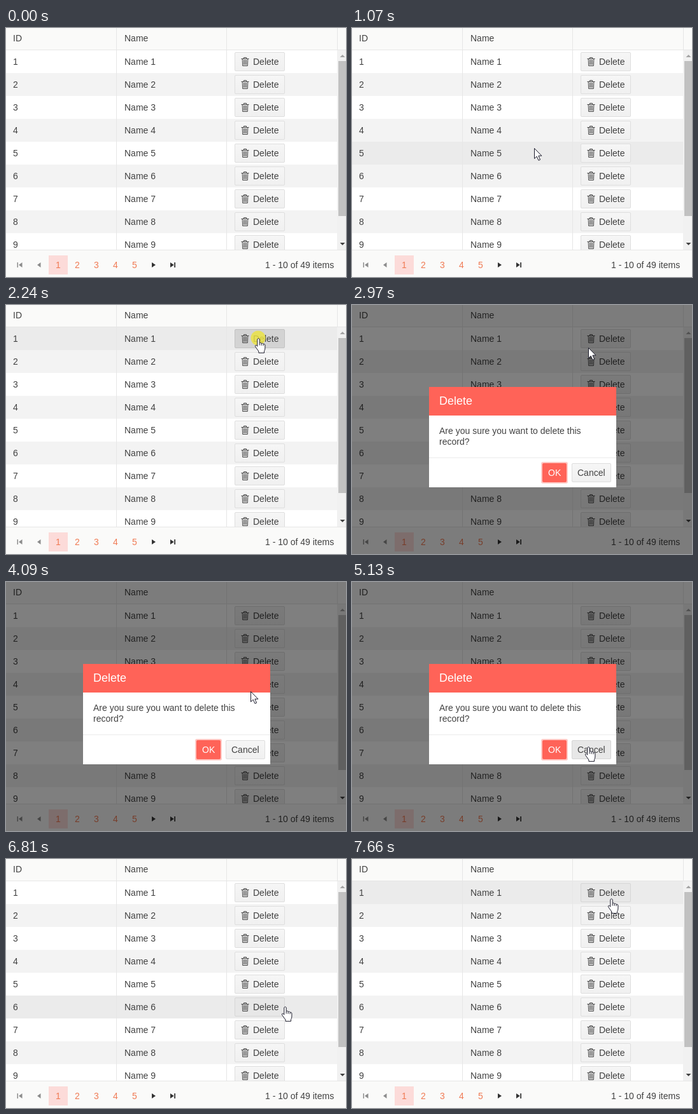
Recreate the animation shown at these times as an HTML page. Size 534 px wide and 392 px high, loop 7990 ms.

```html
<!DOCTYPE html>
<html lang="en">
<head>
<meta charset="utf-8">
<title>Grid delete confirmation</title>
<style>
  html, body { margin: 0; width: 100%; height: 100%; overflow: hidden; background: #fff; }
  svg { display: block; width: 100vw; height: 100vh; }
  text { font: 14px "Liberation Sans", Arial, sans-serif; fill: #424242; white-space: pre; }
  .line { fill: #e6e6e6; }
  .btn { fill: url(#face); stroke: #dedede; }
  .btn.hover { fill: #e7e7e7; stroke: #d6d6d6; }
  .btn.down { fill: #d3d3d3; stroke: #c2c2c2; }
  .icon { fill: none; stroke: #424242; }
  .link { fill: #f07b55; text-anchor: middle; }
  .light { fill: #fff; }
  .cursor { fill: #fff; stroke: #1c1c2c; stroke-linejoin: round; }
</style>
</head>
<body>
<svg id="stage" viewBox="0 0 534 392" preserveAspectRatio="none"></svg>
<script>
const LOOP = 7990;
const ROW_TOP = 35, ROW_H = 36, ROWS = 9;
const OPEN = 2310, CLOSE = 6130;

// Pointer paths: u runs from 0 to 1, result is [x, y].
const line = (a, b) => u => a.map((v, i) => v + (b[i] - v) * u);
const bend = (a, c, b) => u => line(line(a, c)(u), line(c, b)(u))(u);
const orbit = (cx, cy, rx, ry, from, to) => u => {
  const angle = from + (to - from) * u;
  return [cx + rx * Math.cos(angle), cy + ry * Math.sin(angle)];
};

const MOVES = [
  { start: 660, end: 1420, path: bend([238, 382], [270, 169], [346, 88]) },
  { start: 1480, end: 1970, path: bend([353, 82], [380, 60], [396, 52]) },
  { start: 2970, end: 3100, path: line([371, 67], [330, 108]) },
  { start: 3250, end: 4020, path: orbit(274, 192, 140, 106, -1.35, -6.13) },
  { start: 4090, end: 4850, path: orbit(295, 209, 98, 90, -.42, -5.7) },
  { start: 4920, end: 5130, path: line([381, 259], [371, 259]) },
  { start: 6530, end: 7310, path: bend([380, 256], [489, 250], [434, 94]) },
  { start: 7380, end: 7660, path: bend([428, 87], [415, 70], [407, 62]) }
];

const $ = id => document.getElementById(id);
const range = n => [...Array(n).keys()];
const rect = (x, y, w, h, attrs) => `<rect x="${x}" y="${y}" width="${w}" height="${h}" ${attrs}/>`;
const label = (x, y, s, attrs = "") => `<text x="${x}" y="${y}" ${attrs}>${s}</text>`;
const shape = (d, fill) => `<path d="${d}" fill="${fill}"/>`;
const button = (id, x, y, w) => rect(x + .5, y + .5, w - 1, 29, `id="${id}" class="btn" rx="1.5"`);

function rowMarkup(i) {
  const y = ROW_TOP + i * ROW_H;
  return rect(0, y, 520, ROW_H, `id="row${i}"`) +
    label(11, y + 23, i + 1) + label(186, y + 23, "Name " + (i + 1)) +
    button("del" + i, 359, y + 3, 79) +
    `<path class="icon" transform="translate(369 ${y + 11})" d="M.5 2.5H12.5M4.5 2.5V.5H8.5V2.5M2.2 3L2.7 13.5H10.3L10.8 3M4.5 4V12M6.5 4V12M8.5 4V12"/>` +
    label(388, y + 23, "Delete");
}

function gridMarkup() {
  return `<g clip-path="url(#body)">${range(ROWS).map(rowMarkup).join("")}</g>` +
    rect(0, 0, 534, 34, 'fill="#fafaf9"') + rect(0, 34, 534, 1, 'class="line"') +
    label(11, 21, "ID") + label(186, 21, "Name") +
    [173, 346].map(x => rect(x, 0, 1, 349, 'class="line"')).join("") +
    rect(520, 0, 1, 34, 'class="line"') +
    rect(520, 35, 14, 314, 'fill="#f1f1f1"') + rect(522, 52, 12, 244, 'fill="#c1c1c1"') +
    shape("M524.5 46L528.5 42L532.5 46Z", "#a3a3a3") +
    shape("M524.5 338L528.5 342L532.5 338Z", "#404040");
}

function pagerMarkup() {
  return rect(0, 349, 534, 43, 'fill="#fafaf9"') + rect(0, 349, 534, 1, 'class="line"') +
    rect(67, 358, 30, 30, 'fill="#fcdbd9"') +
    range(5).map(i => label(82 + 30 * i, 378, i + 1, 'class="link"')).join("") +
    shape("M17.5 369H19V377H17.5ZM25.5 369V377L20 373Z", "#8c8c8c") +
    shape("M54.5 369V377L49 373Z", "#8c8c8c") +
    shape("M229 369V377L235 373Z", "#333") +
    shape("M258 369V377L263.8 373ZM264.3 369H266V377H264.3Z", "#333") +
    label(407, 378, "1 - 10 of 49 items");
}

function dialogMarkup() {
  return `<g id="modal">` + rect(0, 0, 534, 392, 'fill="#000" opacity=".5"') +
    rect(121, 129, 294, 158, 'fill="#fff"') + rect(121, 129, 294, 45, 'fill="#ff6358"') +
    label(137, 157, "Delete", 'class="light" style="font-size:18px"') +
    label(137, 203, "Are you sure you want to delete this") + label(137, 220, "record?") +
    rect(121, 240, 294, 1, 'fill="#ebebeb"') +
    rect(297, 247, 42, 34, 'rx="3" fill="#ffc9c5"') +
    rect(299, 249, 38, 30, 'rx="2" fill="#ff6358"') +
    label(308, 269, "OK", 'class="light"') +
    button("cancel", 345, 249, 62) + label(354, 269, "Cancel") + `</g>`;
}

$("stage").innerHTML = `<defs>
  <linearGradient id="face" x2="0" y2="1"><stop stop-color="#f6f6f6"/><stop offset="1" stop-color="#f0f0f0"/></linearGradient>
  <clipPath id="body"><rect y="35" width="534" height="314"/></clipPath></defs>` +
  rect(0, 0, 534, 392, 'fill="#fff"') + gridMarkup() + pagerMarkup() + dialogMarkup() +
  `<circle id="ring" r="11.5" fill="#ebe33f" opacity=".82"/>
  <g id="cursor" class="cursor">
    <path id="arrow" d="M.5 .5V16.6L4.2 13.2L7 19.4L9.6 18.3L6.9 12.2H11.9Z"/>
    <path id="hand" transform="translate(.5 0)" d="M-1.7 1.8Q0 -.7 1.7 1.8V7.8Q3.4 6.3 4.6 8.4Q6.4 7.2 7.6 9.4Q9.6 8.4 10.4 11V16Q10.3 19 9 20.6V23.4H.4V21L-4.8 13.7Q-5.8 11.4 -3.8 11L-1.7 13.2ZM1.7 8V11.5M4.6 8.6V11.8M7.6 9.6V12.2"/>
  </g>`;

// The pointer advances in steps of about 70 ms and rests between moves.
function pointer(t) {
  const move = MOVES.filter(m => t >= m.start).pop();
  if (!move) return null;
  const span = move.end - move.start, steps = Math.round(span / 70);
  const step = Math.floor((t - move.start) / span * steps + .15);
  return move.path(Math.min(step / steps, 1)).map(Math.round);
}

const show = (id, on) => $(id).setAttribute("display", on ? "inline" : "none");
const setButton = (id, over, down) =>
  $(id).setAttribute("class", "btn" + (over ? down ? " down" : " hover" : ""));

function draw(t) {
  const pos = pointer(t), [x, y] = pos || [-99, -99];
  const modal = t >= OPEN && t < CLOSE;
  const click = [OPEN, CLOSE].some(at => t >= at - 70 && t < at + 60);
  const within = (left, top, w) => x >= left && x <= left + w && y >= top && y <= top + 30;
  const onCancel = modal && within(345, 249, 62);
  let hand = onCancel || modal && within(299, 249, 38);

  for (const i of range(ROWS)) {
    const top = ROW_TOP + i * ROW_H;
    const inRow = !modal && y >= top && y < Math.min(top + ROW_H, 349);
    const over = inRow && within(359, top + 3, 79);
    hand = hand || over;
    $("row" + i).setAttribute("fill", inRow ? "#ebebeb" : i % 2 ? "#f3f3f3" : "#fff");
    setButton("del" + i, over, click && t < OPEN);
  }
  setButton("cancel", onCancel, click);
  show("modal", modal);
  show("ring", click);
  show("cursor", pos);
  show("hand", hand);
  show("arrow", !hand);
  const at = `translate(${x} ${y})`;
  $("cursor").setAttribute("transform", at);
  $("ring").setAttribute("transform", at);
}

const begin = performance.now();
function tick() {
  draw((performance.now() - begin) % LOOP);
  requestAnimationFrame(tick);
}
tick();
</script>
</body>
</html>
```
